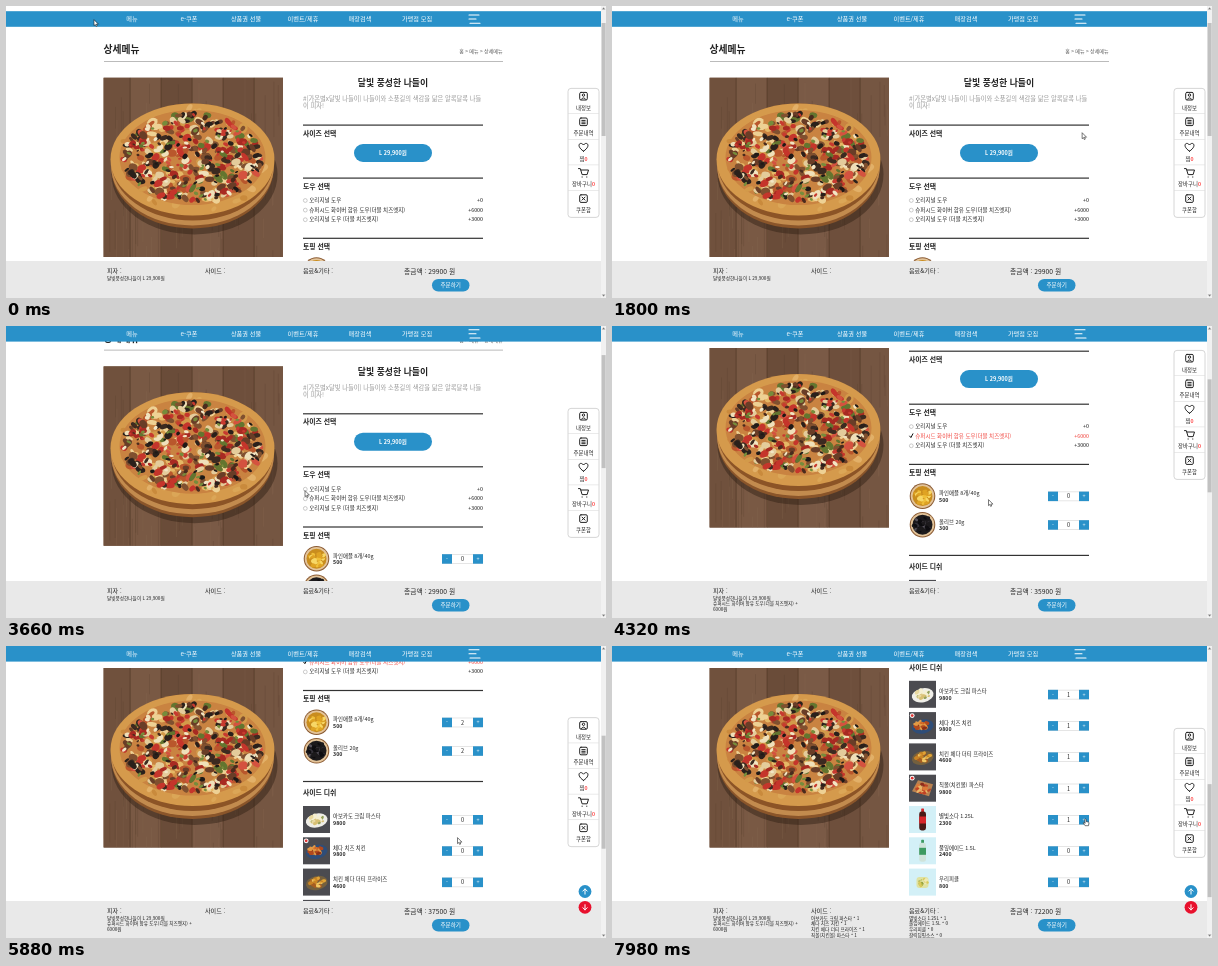
An HTML page that plays this animation: 600 by 292 pixels, repeating every 8000 ms.

```html
<!DOCTYPE html>
<html lang="ko">
<head>
<meta charset="utf-8">
<title>상세메뉴</title>
<style>
html, body { margin: 0; width: 100%; height: 100%; overflow: hidden; background: #fff; }
svg { display: block; width: 100%; height: 100%; }
text { font-family: "Noto Sans CJK KR", "Noto Sans KR", "Noto Sans CJK", "Noto Sans", sans-serif; white-space: pre; }
</style>
</head>
<body>
<svg id="stage" viewBox="0 0 600 292"></svg>
<script>
const LOOP = 8000, STEP = 60, NOTCH = 31.3, FOLLOW = 400;
const BLUE = '#2991c9', INK = '#222', RED = '#f0433c';
const stage = document.getElementById('stage');

function el(parent, tag, attrs = {}, content) {
  const node = document.createElementNS('http://www.w3.org/2000/svg', tag);
  for (const key in attrs) node.setAttribute(key, attrs[key]);
  if (content !== undefined) node.textContent = content;
  return parent.appendChild(node);
}
const group = (parent, attrs) => el(parent, 'g', attrs);
const rect = (parent, x, y, width, height, fill, more) =>
  el(parent, 'rect', { x, y, width, height, fill, ...more });
const ellipse = (parent, cx, cy, rx, ry, fill, more) =>
  el(parent, 'ellipse', { cx, cy, rx, ry, fill, ...more });
const path = (parent, d, stroke, width = 1, fill = 'none') =>
  el(parent, 'path', { d, stroke, fill, 'stroke-width': width, 'stroke-linejoin': 'round', 'stroke-linecap': 'round' });
// y is the optical middle of the line
const label = (parent, x, y, size, content, more) =>
  el(parent, 'text', { x, y: y + size * 0.37, 'font-size': size, fill: INK, ...more }, content);
const MID = { 'text-anchor': 'middle' }, END = { 'text-anchor': 'end' }, BOLD = { 'font-weight': 700 };
const move = (node, x, y) => node.setAttribute('transform', `translate(${x} ${y})`);

let seed = 11;
function rnd() {
  seed = (seed * 16807) % 2147483647;
  return seed / 2147483647;
}
function scatter(parent, n, cx, cy, rx, ry, colors, size) {
  for (let i = 0; i < n; i++) {
    const a = rnd() * Math.PI * 2, d = Math.sqrt(rnd()), s = size * (0.6 + rnd() * 0.7);
    const x = cx + Math.cos(a) * d * rx, y = cy + Math.sin(a) * d * ry;
    ellipse(parent, x, y, s, s * (0.45 + rnd() * 0.35), colors[Math.floor(rnd() * colors.length)],
      { transform: `rotate(${rnd() * 120 - 60} ${x} ${y})` });
  }
}

/* ---- product page ---- */
const page = group(stage);
label(page, 97.5, 43.5, 9.8, '상세메뉴', BOLD);
label(page, 496.5, 45, 5, '홈 > 메뉴 > 상세메뉴', { ...END, fill: '#555' });
rect(page, 98, 55, 399, 0.8, '#aaa');
label(page, 387, 77, 8.9, '달빛 풍성한 나들이', { ...MID, ...BOLD });
label(page, 297, 92.5, 6.25, '#[가온별x달빛 나들이] 나들이와 소풍길의 색감을 닮은 알록달록 나들', { fill: '#999' });
label(page, 297, 100, 6.25, '이 피자!', { fill: '#999' });
[['사이즈 선택', 119], ['도우 선택', 172], ['토핑 선택', 232.2], ['사이드 디쉬', 323.2]].forEach(([name, y], i) => {
  rect(page, 297, y - 0.5, 180, 1.2, '#333');
  label(page, 297, y + (i === 3 ? 10.8 : 8.2), 6.85, name, BOLD);
});
rect(page, 348, 138, 78, 18, BLUE, { rx: 9 });
label(page, 387, 147.3, 5.5, 'L 29,900원', { ...MID, ...BOLD, fill: '#fff' });

const doughs = [['오리지널 도우', '+0'], ['슈퍼시드 화이버 함유 도우(더블 치즈엣지)', '+6000'], ['오리지널 도우 (더블 치즈엣지)', '+3000']]
  .map(([name, price], i) => {
    const y = 194 + i * 9.6;
    return {
      box: ellipse(page, 299.3, y + 0.5, 1.9, 1.9, '#fff', { stroke: '#aaa', 'stroke-width': 0.6 }),
      texts: [label(page, 303.3, y, 5.5, name), label(page, 477, y, 5.3, price, END)]
    };
  });
const check = path(page, 'M297.7 204 l1.2 1.5 2-3.8', '#111', 1);

function bowl(y, colors) {
  ellipse(page, 310.5, y, 12.8, 12.8, '#8a5a32');
  ellipse(page, 310.5, y, 11.8, 11.8, '#e3c49a');
  ellipse(page, 310.5, y, 10, 10, colors[0]);
  scatter(page, 28, 310.5, y, 8, 8, colors, 2.6);
}
const pictures = [
  y => bowl(y, ['#c98d1e', '#f0bf38', '#f7d766', '#dfa323']),
  y => bowl(y, ['#1c1a1c', '#35323a', '#0e0d10', '#57535c']),
  y => { dark(y); dish(y, '#efeee8', ['#e9d9a0', '#d8c074', '#94a05a', '#f5efd2']); },
  y => { dark(y); dish(y, '#2f4d78', ['#b2491d', '#d8702a', '#8b2f17', '#e39a45']); badge(y); },
  y => { dark(y); dish(y, '#74603e', ['#e0a436', '#c98425', '#f1c763', '#a65d22']); },
  y => {
    dark(y);
    el(page, 'polygon', { points: `300,${y + 3} 306,${y - 8} 321,${y - 4} 317,${y + 8}`, fill: '#b98250' });
    scatter(page, 24, 311, y, 7, 5, ['#c04325', '#dd7a38', '#8f2c1b', '#e8b668'], 2.3);
    badge(y);
  },
  y => { pale(y); bottle(y, '#4a1a17', '#d7262b'); },
  y => { pale(y); bottle(y, '#cfe3da', '#3d9a61'); },
  y => {
    pale(y);
    rect(page, 304.5, y - 5, 12, 11, '#dfe2a2', { rx: 3 });
    scatter(page, 16, 310.5, y, 4.5, 4, ['#b4b847', '#d9c95c', '#8b9a3a', '#efe9b3'], 1.8);
  }
];
const dark = y => rect(page, 297, y - 13.5, 27, 27, '#4b4b50');
const pale = y => rect(page, 297, y - 13.5, 27, 27, '#d3f0f7');
const badge = y => { ellipse(page, 300.2, y - 10, 2.4, 2.4, '#fff'); ellipse(page, 300.2, y - 10, 1.4, 1.4, '#d33'); };
function dish(y, rim, colors) {
  ellipse(page, 310.5, y + 1, 11, 7, rim, { transform: `rotate(-12 310.5 ${y})` });
  scatter(page, 30, 310.5, y, 7.5, 4.2, colors, 2.2);
}
function bottle(y, body, band) {
  rect(page, 309.2, y - 11, 2.8, 5, band, { rx: 0.6 });
  rect(page, 307.2, y - 8, 6.8, 19, body, { rx: 2.4 });
  rect(page, 307.2, y - 3, 6.8, 7, band);
}

const items = [
  ['파인애플 8개/40g', 500], ['올리브 20g', 300], ['아보카도 크림 파스타', 9800], ['체다 치즈 치킨', 9800],
  ['치킨 체다 더티 프라이즈', 4600], ['칙볼(치킨볼) 파스타', 9800], ['별빛소다 1.25L', 2300],
  ['풀잎에이드 1.5L', 2400], ['우리피클', 800], ['갈릭딥핑소스', 300]
];
const itemY = i => i < 2 ? 264 + i * 28.6 : 361.3 + (i - 2) * NOTCH;
const counters = items.slice(0, 9).map(([name, price], i) => {
  const y = itemY(i);
  pictures[i](y);
  label(page, 327, y - 3, 5.4, name);
  label(page, 327, y + 3.6, 5.3, price, BOLD);
  rect(page, 436.3, y - 4.2, 40.5, 9, '#fff', { stroke: '#ccc', 'stroke-width': 0.5 });
  [[436, '-'], [467, '+']].forEach(([x, sign]) => {
    rect(page, x, y - 4.5, 10, 9.5, BLUE);
    label(page, x + 5, y + 0.2, 5.5, sign, { ...MID, fill: '#fff' });
  });
  return label(page, 456.5, y + 0.3, 5.5, '0', MID);
});

/* ---- pizza picture ---- */
const defs = el(stage, 'defs');
el(el(defs, 'clipPath', { id: 'frame' }), 'rect', { width: 179.5, height: 179.5 });
const photo = group(stage);
const pizza = group(photo, { 'clip-path': 'url(#frame)' });
rect(pizza, 0, 0, 180, 180, '#6f503c');
['#70513d', '#795944', '#6a4c39', '#7a5a46', '#6e4f3c', '#755642'].forEach((c, i) => {
  rect(pizza, i * 31 - 4, 0, 30.3, 180, c);
  rect(pizza, i * 31 + 26.3, 0, 0.8, 180, '#45301f');
});
for (let i = 0; i < 90; i++)
  rect(pizza, rnd() * 180, rnd() * 180, 0.6, 15 + rnd() * 45, rnd() < 0.5 ? '#57402f' : '#8a6a53', { opacity: 0.4 });
ellipse(pizza, 91, 97, 83, 60, '#2e1d12', { opacity: 0.45 });
ellipse(pizza, 89, 91, 81, 60, '#8a552a');
ellipse(pizza, 89, 88, 81.5, 60, '#c28b4e');
ellipse(pizza, 89, 84.5, 81, 58.5, '#8c5426');
ellipse(pizza, 89, 82, 82, 56, '#d59a4c');
scatter(pizza, 90, 89, 82, 77, 52, ['#e2b068', '#c98a3c', '#dba657'], 4);
ellipse(pizza, 89, 80, 73, 47.5, '#c98341');
scatter(pizza, 130, 89, 80, 70, 45, ['#e5b866', '#d39a4a', '#b9572c', '#eed194'], 4.5);
scatter(pizza, 270, 89, 80, 69, 44,
  ['#c5352b', '#a82a22', '#d4523f', '#2a201b', '#3c2a20', '#693d27', '#80502f', '#efe0ba', '#e4cc9b', '#63752f'], 4);
scatter(pizza, 110, 89, 80, 69, 44, ['#f2e5c4', '#1f1916', '#c73a2f', '#768c3b', '#4a2b1d'], 2.4);

/* ---- header ---- */
const header = group(stage);
rect(header, 0, 0, 595, 15.6, BLUE);
['메뉴', 'e-쿠폰', '상품권 선물', '이벤트/제휴', '매장검색', '가맹점 모집'].forEach((name, i) =>
  label(header, 126 + i * 57, 8, 6.2, name, { ...MID, fill: '#fff', 'font-weight': 500 }));
path(header, 'M463 3.8h10 M463 7.8h7 M464 12h10', '#fff', 1.1);

/* ---- follow-along side menu ---- */
const side = group(stage);
rect(side, 562, 0.4, 31, 129, '#fff', { rx: 3, stroke: '#ccc', 'stroke-width': 0.8 });
const frameIcon = 'M575 -3.6h5q1.3 0 1.3 1.3v5q0 1.3 -1.3 1.3h-5q-1.3 0 -1.3-1.3v-5q0-1.3 1.3-1.3z';
const icons = [
  frameIcon + ' M576.3 -0.9a1.2 1.2 0 1 0 2.4 0a1.2 1.2 0 1 0-2.4 0 M575.2 3.4q2.3-3.3 4.6 0',
  frameIcon + ' M575.8 -1.2h3.4 M575.8 0.5h3.4 M575.8 2.1h3.4',
  'M577.5 4 C569 -1.5 574.5 -6.5 577.5 -2.2 C580.5 -6.5 586 -1.5 577.5 4z',
  'M572.5 -4.2h1.8l1.8 6h5l1.4-4.6h-7.4 M576 4.2h.3 M580.6 4.2h.3',
  frameIcon + ' M576 -1.3l3 3 M579 -1.3l-3 3'
];
['내정보', '주문내역', '찜', '장바구니', '쿠폰함'].forEach((name, i) => {
  const y = 25.6 * i;
  if (i) rect(side, 562, y - 0.2, 31, 0.6, '#ddd');
  path(group(side, { transform: `translate(0 ${y + 8})` }), icons[i], '#222', 1);
  const text = label(side, 577.5, y + 19.6, 5.4, name, { ...MID, 'font-weight': 500 });
  if (i === 2 || i === 3) el(text, 'tspan', { fill: '#f00' }, '0');
});

/* ---- order bar ---- */
const bar = group(stage);
rect(bar, 0, 255, 595, 37, '#e9e9e9');
[[101, '피자 :'], [199, '사이드 :'], [297, '음료&기타 :']].forEach(([x, name]) => label(bar, x, 265, 6.1, name));
const small = (x, row, content) => label(bar, x, 271.8 + row * 5.7, 4.65, content);
small(101, 0, '달빛풍성한나들이 L 29,900원');
const extra = group(bar);
['슈퍼시드 화이버 함유 도우(더블 치즈엣지) +', '6000원'].forEach((line, i) =>
  extra.append(small(101, i + 1, line)));
const orders = items.slice(2).map((_, i) => small(i < 4 ? 199 : 297, i % 4, ''));
const total = label(bar, 398, 266, 6.75, '');
rect(bar, 426, 273, 37.5, 12.5, BLUE, { rx: 6.2 });
label(bar, 444.7, 279.3, 5.6, '주문하기', { ...MID, fill: '#fff' });

const jump = group(stage);
[[245.5, BLUE, -1], [261.3, '#e8112d', 1]].forEach(([y, color, dir]) => {
  ellipse(jump, 579, y, 6.4, 6.4, color);
  path(jump, `M579 ${y - 2.6 * dir}v${5.2 * dir} M576.8 ${y + 0.4 * dir}l2.2 ${2.2 * dir} 2.2 ${-2.2 * dir}`, '#fff', 1);
});

/* ---- scrollbar and pointer ---- */
rect(stage, 595, 0, 5, 292, '#f1f1f1');
path(stage, 'M596.3 3.2l1.3-1.6 1.3 1.6z', '#777', 0.2, '#777');
path(stage, 'M596.3 288.8l1.3 1.6 1.3-1.6z', '#777', 0.2, '#777');
const thumb = rect(stage, 595.6, 17, 4, 113, '#c1c1c1');
const pointer = group(stage);
const arrow = path(pointer, 'M0 0v5.6l1.3-1.1 .9 2 1-.5-.9-1.9h1.7z', '#222', 0.6, '#fff');
const hand = path(pointer, 'M-.6 .3q.6-.7 1.2 0v2.2l2.4.6q.6.3.5 1l-.5 2.6h-3.4l-1.9-2.8q.3-.9 1.7.2z', '#222', 0.6, '#fff');

/* ---- timeline ---- */
const scrolls = [[2940, 1, 100], [4250, 2, 70], [5568, 3, 120], [6300, 1, 60], [6720, 1, 60], [7140, 1, 60], [7560, 1, 60]];
const DOUGH_AT = 3840, SIDES_AT = 6120;
// time, item, amount added to the total
const clicks = [[4620, 0, 500], [4740, 0, 500], [5040, 1, 300], [5160, 1, 300],
  [SIDES_AT, 2, 9800], [6540, 3, 9800], [6960, 4, 4600], [7380, 5, 8200], [7860, 6, 2300]];
const trail = [[0, 88, 14], [180, 88, 14], [780, 500, 116], [960, 502, 118], [1740, 506, 122], [2080, 27, 190],
  [2250, 100, 190], [2520, 419.5, 146], [2800, 419.5, 146], [3300, 300, 166], [3660, 299, 165], [3800, 298.5, 170],
  [3960, 298.5, 170], [4200, 370, 172], [4320, 376.5, 174], [4560, 472, 168], [4800, 472, 168], [4980, 472, 197],
  [5220, 472, 197], [5500, 455, 195], [5880, 451.5, 192], [6060, 473.5, 173], [LOOP, 473.5, 173]];
const handTimes = [[2460, 2860], [4540, 5280], [6030, LOOP]];

const clamp = v => Math.max(0, Math.min(1, v));
const swing = p => 0.5 - Math.cos(clamp(p) * Math.PI) / 2;

function pointerAt(t) {
  const i = Math.max(1, trail.findIndex(k => k[0] >= t));
  const [t0, x0, y0] = trail[i - 1], [t1, x1, y1] = trail[i];
  const p = swing((t - t0) / (t1 - t0));
  return [x0 + (x1 - x0) * p, y0 + (y1 - y0) * p];
}
const show = (node, on) => node.setAttribute('opacity', on ? 1 : 0);
function write(node, value) {
  if (node.textContent !== value) node.textContent = value;
}

function draw(t) {
  let scroll = 0, followed = 0;
  for (const [at, notches, length] of scrolls) {
    scroll += notches * NOTCH * swing((t - at) / length);
    followed += notches * NOTCH * swing((t - at) / FOLLOW);
  }
  move(page, 0, -scroll);
  move(photo, 97.5, Math.max(71.5 - scroll, 22));
  move(header, 0, Math.max(0, 5.2 - scroll));
  move(side, 0, 82 - scroll + followed);
  thumb.setAttribute('y', 17 + scroll * 0.387);
  show(jump, scroll > 125);

  const picked = t >= DOUGH_AT;
  show(check, picked);
  show(extra, picked);
  show(doughs[1].box, !picked);
  doughs[1].texts.forEach(text => text.setAttribute('fill', picked ? RED : INK));

  const counts = items.map(() => 0);
  let sum = picked ? 35900 : 29900;
  for (const [at, item, amount] of clicks) if (t >= at) { counts[item]++; sum += amount; }
  counters.forEach((node, i) => write(node, String(counts[i])));
  orders.forEach((node, i) => write(node, t >= SIDES_AT ? `${items[i + 2][0]} * ${counts[i + 2]}` : ''));
  write(total, `총금액 : ${sum} 원`);

  move(pointer, ...pointerAt(t));
  const pointing = handTimes.some(([a, b]) => t >= a && t < b);
  show(hand, pointing);
  show(arrow, !pointing);
}

const start = performance.now();
function tick() {
  const t = (performance.now() - start) % LOOP;
  draw(Math.floor(t / STEP) * STEP);
  requestAnimationFrame(tick);
}
draw(0);
requestAnimationFrame(tick);
</script>
</body>
</html>
```
